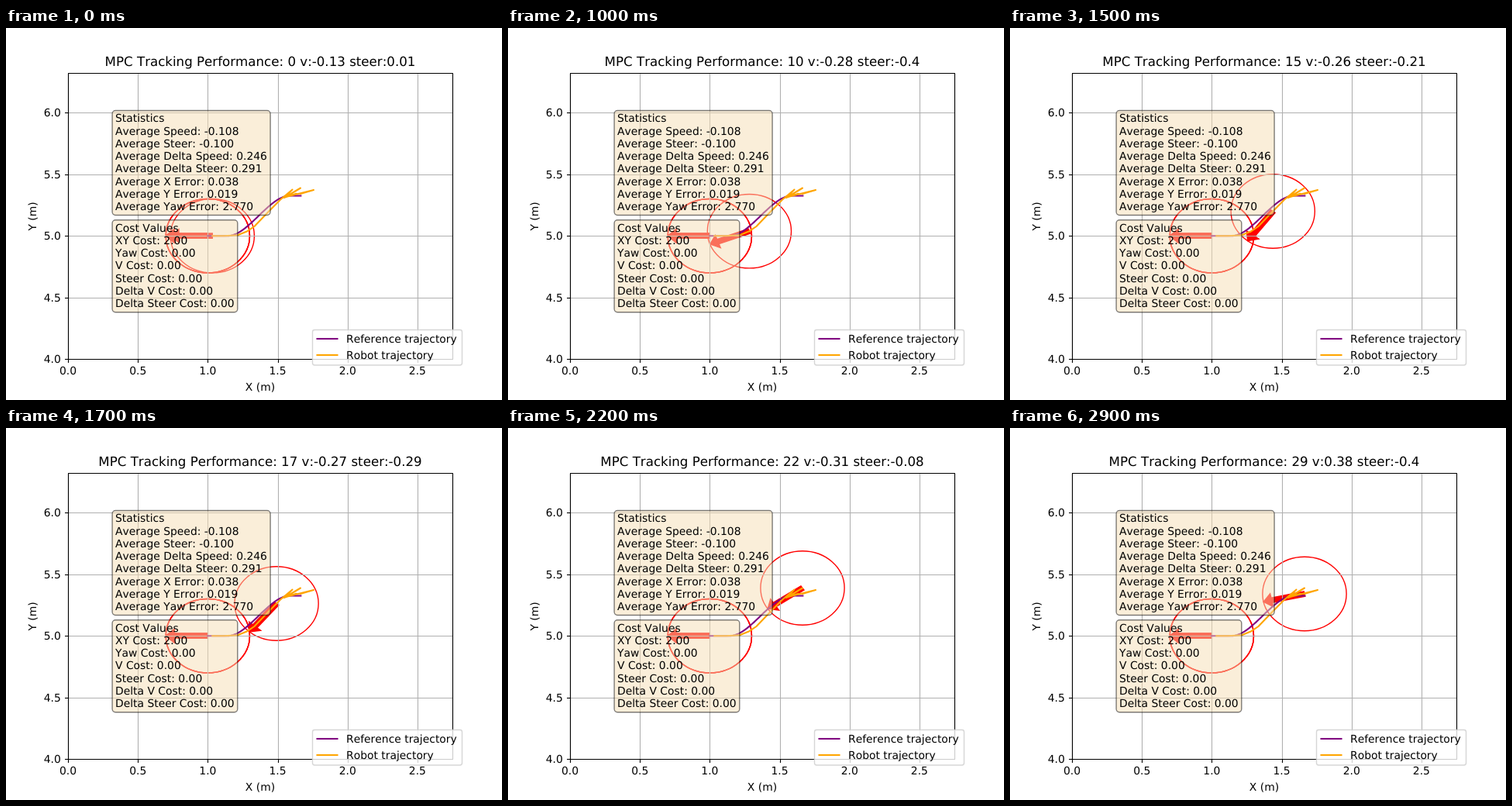
An HTML page with a canvas for the animation above (3 s loop, 640 by 480 pixels).

```html
<!DOCTYPE html>
<html lang="en">
<head>
<meta charset="utf-8">
<title>MPC Tracking Performance</title>
<style>
  html, body { margin: 0; width: 100%; height: 100%; overflow: hidden; background: #fff; }
  canvas { display: block; width: 640px; height: 480px; }
</style>
</head>
<body>
<canvas id="plot" width="640" height="480"></canvas>
<script>
const ctx = document.getElementById('plot').getContext('2d');
const PT = 100 / 72;
const FONT = '"DejaVu Sans", Verdana, sans-serif';
const STEP_MS = 100, STEPS = 30;

// Data units to pixels
const SX = 180.36, SY = 159;
const px = x => 80 + x * SX;
const py = y => 427.2 - (y - 4) * SY;
const snap = v => Math.floor(v + 0.5) + 0.5;

// Turning points of the drive: step, pixel x, pixel y
const route = [
  [0, 266.3, 268.2], [5, 281.3, 268.2], [8, 299, 267.2], [10, 311.4, 262.2], [12, 320.5, 256],
  [15, 339.2, 236.5], [18, 354, 221.5], [20, 369.5, 208.5], [21, 359, 219], [22, 380, 206.5],
  [23, 360, 218.5], [25, 374.5, 213.7], [26, 361, 218], [28, 397, 209], [29, 380, 214]
];

// Step, degrees below the negative x axis, speed, steering
const controls = [
  [0, 0, -0.13, 0.01], [5, 4.5, 0.01, 0.4], [10, 20.5, -0.28, -0.4], [15, 53, -0.26, -0.21],
  [20, 45.5, -0.29, -0.4], [25, 17, -0.35, 0.4], [29, 12.5, 0.38, -0.4]
];

const statistics = ['Statistics', 'Average Speed: -0.108', 'Average Steer: -0.100',
  'Average Delta Speed: 0.246', 'Average Delta Steer: 0.291', 'Average X Error: 0.038',
  'Average Y Error: 0.019', 'Average Yaw Error: 2.770'];
const costs = ['Cost Values', 'XY Cost: 2.00', 'Yaw Cost: 0.00', 'V Cost: 0.00',
  'Steer Cost: 0.00', 'Delta V Cost: 0.00', 'Delta Steer Cost: 0.00'];

// Linear interpolation between keys that start with their step
function at(keys, step) {
  const i = Math.max(1, keys.findIndex(k => k[0] >= step));
  const a = keys[i - 1], b = keys[i];
  const t = (step - a[0]) / (b[0] - a[0]);
  return a.slice(1).map((v, j) => v + (b[j + 1] - v) * t);
}

// A level line that climbs smoothly to a second level
function referencePoints() {
  const points = [];
  for (let x = px(1); x < 383; x += 3) {
    const t = Math.min(1, Math.max(0, (x - 286) / 80));
    points.push([x, py(5 + 0.325 * t * t * (3 - 2 * t))]);
  }
  return points;
}

function text(str, x, y, align = 'left', size = 10) {
  ctx.font = `${size * PT}px ${FONT}`;
  ctx.textAlign = align;
  ctx.fillStyle = '#000';
  ctx.fillText(str, x, y);
}

function path(points, color, width) {
  ctx.beginPath();
  points.forEach(([x, y]) => ctx.lineTo(x, y));
  ctx.strokeStyle = color;
  ctx.lineWidth = width * PT;
  ctx.stroke();
}

function panel(x, y, w, h, r, fill, edge, alpha) {
  ctx.globalAlpha = alpha;
  ctx.beginPath();
  ctx.roundRect(x, y, w, h, r);
  ctx.fillStyle = fill;
  ctx.fill();
  ctx.strokeStyle = edge;
  ctx.lineWidth = PT;
  ctx.stroke();
  ctx.globalAlpha = 1;
}

function robot(x, y, degrees) {
  ctx.strokeStyle = ctx.fillStyle = '#f00';
  ctx.lineWidth = PT;
  ctx.beginPath();
  ctx.ellipse(x, y, 0.3 * SX, 0.3 * SY, 0, 0, 2 * Math.PI);
  ctx.stroke();

  const shaft = 0.02, head = 0.054, neck = 0.24, tip = 0.3;
  const angle = degrees * Math.PI / 180;
  const c = Math.cos(angle), s = Math.sin(angle);
  ctx.beginPath();
  [[0, shaft], [neck, shaft], [neck, head], [tip, 0], [neck, -head], [neck, -shaft], [0, -shaft]]
    .forEach(([u, v]) => ctx.lineTo(x - (u * c + v * s) * SX, y + (u * s - v * c) * SY));
  ctx.closePath();
  ctx.fill();
  ctx.stroke();
}

function gridAndTicks() {
  for (let i = 0; i < 6; i++) {
    const x = snap(px(i / 2));
    path([[x, 58], [x, 427]], '#b0b0b0', 0.8);
    path([[x, 428], [x, 432]], '#000', 0.8);
    text((i / 2).toFixed(1), px(i / 2), 447, 'center');
  }
  for (let i = 0; i < 5; i++) {
    const y = snap(py(4 + i / 2));
    path([[80, y], [576, y]], '#b0b0b0', 0.8);
    path([[76, y], [80, y]], '#000', 0.8);
    text((4 + i / 2).toFixed(1), 70.8, Math.floor(y) + 5, 'right');
  }
}

function textPanel(lines, top, width, height, baseline) {
  panel(137.1, top, width, height, 4.17, '#f5deb3', '#000', 0.5);
  lines.forEach((line, i) => text(line, 141, Math.round(baseline + i * 16.25)));
}

function legend() {
  panel(395.5, 389.5, 193, 45.5, 2.8, '#fff', '#ccc', 0.8);
  [['Reference trajectory', '#800080', 401], ['Robot trajectory', '#ffa500', 422]].forEach(([label, color, y]) => {
    path([[401.5, y], [427.5, y]], color, 1.5);
    text(label, 439, y + 5);
  });
}

function draw(step) {
  const [x, y] = at(route, step);
  const [heading, v, steer] = at(controls, step);
  ctx.fillStyle = '#fff';
  ctx.fillRect(0, 0, 640, 480);
  ctx.lineJoin = 'miter';
  ctx.lineCap = 'butt';

  // The resting pose is overdrawn, which hardens its outline
  for (let i = 0; i < 3; i++) robot(px(1), py(5), 0);
  robot(x, y, heading);
  gridAndTicks();

  ctx.lineJoin = 'round';
  ctx.lineCap = 'square';
  path(referencePoints(), '#800080', 1.5);
  path(route.map(key => key.slice(1)), '#ffa500', 1.5);

  ctx.strokeStyle = '#000';
  ctx.lineWidth = 0.8 * PT;
  ctx.strokeRect(80.5, 58.5, 496, 369);

  text('X (m)', 328, 468, 'center');
  ctx.save();
  ctx.translate(39, 243);
  ctx.rotate(-Math.PI / 2);
  text('Y (m)', 0, 0, 'center');
  ctx.restore();

  textPanel(statistics, 106.5, 204, 135, 121.4);
  textPanel(costs, 247.7, 161.7, 119, 262.6);
  const round = n => +n.toFixed(2);
  text(`MPC Tracking Performance: ${step} v:${round(v)} steer:${round(steer)}`, 328, 49, 'center', 12);
  legend();
}

ctx.textRendering = 'geometricPrecision';
ctx.fontKerning = 'none';

function tick() {
  draw(Math.floor(performance.now() / STEP_MS) % STEPS);
  requestAnimationFrame(tick);
}
tick();
</script>
</body>
</html>
```
